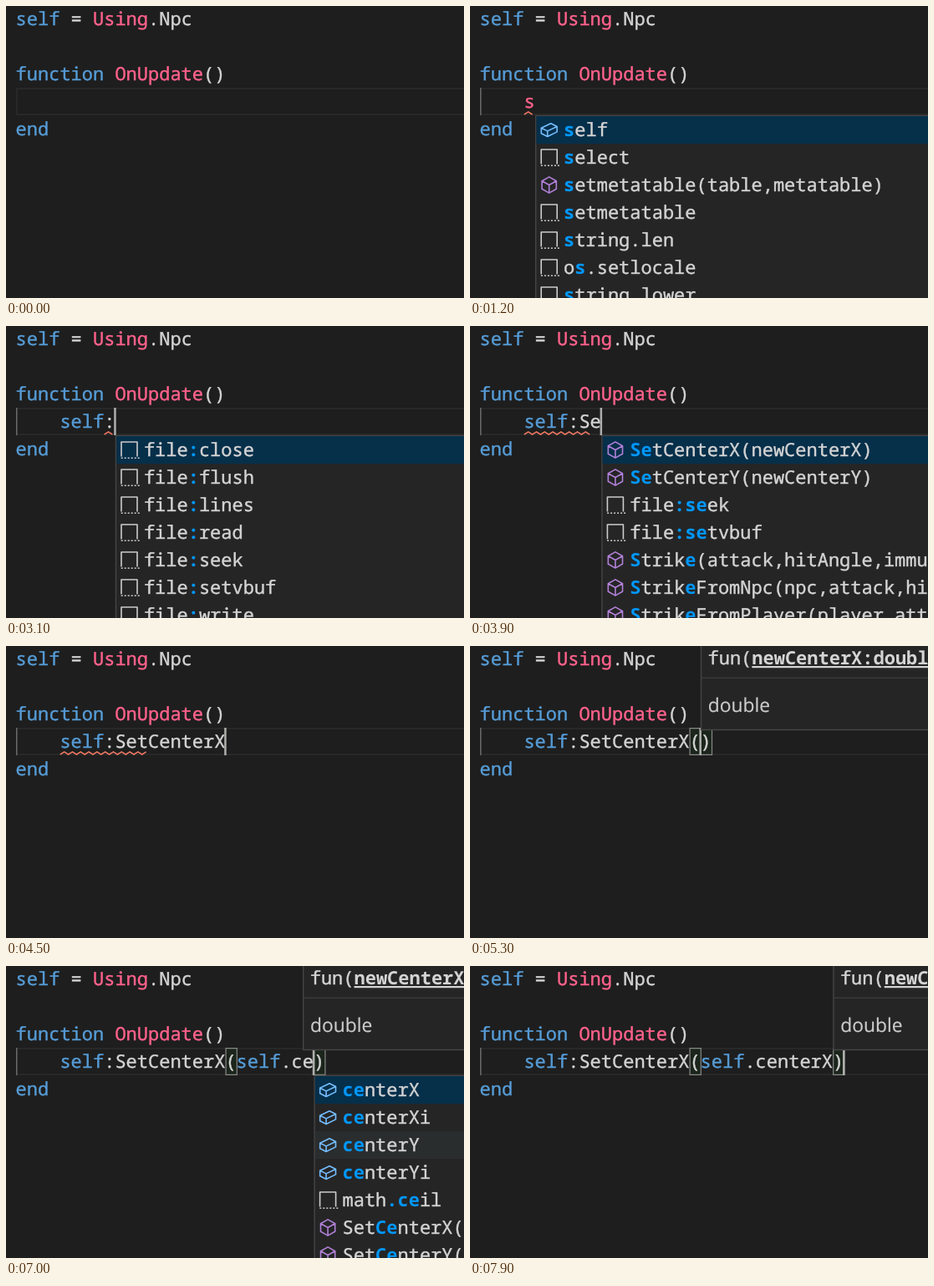
An HTML page for the animation above (8 s loop, 548x350 px).

```html
<!DOCTYPE html>
<html lang="en">
<head>
<meta charset="utf-8">
<title>Editor completion</title>
<style>
  html, body { margin: 0; width: 100%; height: 100%; overflow: hidden; background: #1e1e1e; }
  svg { display: block; width: 548px; height: 350px; }
  text { font: 22px "Noto Sans Mono", "DejaVu Sans Mono", monospace; color: #d4d4d4;
         white-space: pre; text-rendering: geometricPrecision; }
  text, tspan { fill: currentColor; stroke: currentColor; stroke-width: .4; }
  .kw { color: #569cd6; }
  .id { color: #ff628c; }
  .hit { color: #0097fb; font-weight: bold; stroke: none; }
  .param { font-weight: bold; text-decoration: underline; stroke: none; }
  .doc { font: 22.8px "Open Sans", "Noto Sans", sans-serif; color: #cccccc; stroke-width: .2; }
  .panel { fill: #252526; stroke: #454545; stroke-width: 1.4; }
  .icon { fill: none; stroke-linejoin: round; }
</style>
</head>
<body>
<svg id="stage" viewBox="0 0 548 350"></svg>
<script>
const stage = document.getElementById('stage');
const LOOP = 8000, ADV = 13.2, ROW = 33, TOP = 98;
const colX = c => 12 + ADV * c;

// Each item: icon letter (t text, m method, f field), then the label
const LISTS = {
  io: ['close', 'flush', 'input', 'lines', 'open', 'output', 'popen'].map(n => 't io.' + n),
  file: ['close', 'flush', 'lines', 'read', 'seek', 'setvbuf', 'write'].map(n => 't file:' + n),
  set: ['m SetCenterX(newCenterX)', 'm SetCenterY(newCenterY)', 't file:seek', 't file:setvbuf',
    'm Strike(attack,hitAngle,immuneTime)', 'm StrikeFromNpc(npc,attack,hitAngle)',
    'm StrikeFromPlayer(player,attack,hitAngle)'],
  self: ['f self', 't select', 'm setmetatable(table,metatable)', 't setmetatable',
    't string.len', 't os.setlocale', 't string.lower'],
  center: ['f centerX', 'f centerXi', 'f centerY', 'f centerYi', 't math.ceil',
    'm SetCenterX(newCenterX)', 'm SetCenterY(newCenterY)']
};
LISTS.set3 = LISTS.set.filter(s => !s.endsWith('seek'));

const CALL = 'self:SetCenterX(';
// Every step changes only the listed properties
const STEPS = [
  [0, { code: '', tail: '', caret: 0, guide: 0, list: '', wave: null, hint: 0, boxes: 0 }],
  [400, { caret: 1 }],
  [800, { code: 's', guide: 1 }],
  [900, { list: 'self', wave: [4, 5] }],
  [1200, { caret: 0 }],
  [1500, { code: 'self', caret: 1, list: '' }],
  [1700, { wave: [4, 8] }],
  [1900, { code: 'self.' }],
  [2000, { list: 'io' }],
  [2100, { wave: [8, 9] }],
  [2500, { caret: 0 }],
  [2600, { code: 'self', caret: 1, list: '', wave: null }],
  [2700, { wave: [4, 8] }],
  [3100, { code: 'self:', list: 'file', wave: [8, 9] }],
  [3500, { code: 'self:S', list: 'set' }],
  [3600, { wave: [4, 10] }],
  [3900, { code: 'self:Se' }],
  [4100, { code: 'self:Set', list: 'set3' }],
  [4200, { wave: [4, 12] }],
  [4500, { code: 'self:SetCenterX', list: '' }],
  [4700, { wave: [4, 19] }],
  [4900, { caret: 0 }],
  [5200, { code: CALL, tail: ')', caret: 1, wave: null }],
  [5300, { hint: 20, boxes: 1 }],
  [5500, { code: CALL + 's' }],
  [5600, { list: 'self', hint: 21 }],
  [5700, { code: CALL + 'se' }],
  [5800, { code: CALL + 'sel', hint: 22 }],
  [5900, { hint: 23 }],
  [6000, { code: CALL + 'self' }],
  [6100, { list: '', hint: 24 }],
  [6200, { code: CALL + 'self.' }],
  [6300, { list: 'io', hint: 25 }],
  [6600, { caret: 0 }],
  [6900, { code: CALL + 'self.c', list: 'center', caret: 1 }],
  [7000, { code: CALL + 'self.ce', hint: 26 }],
  [7100, { code: CALL + 'self.cen', hint: 27 }],
  [7200, { hint: 28 }],
  [7500, { code: CALL + 'self.centerX', list: '', hint: 32 }],
  [7900, { code: CALL + 'self.centerX)', tail: '' }]
];

const span = (cls, s) => `<tspan class="${cls}">${s}</tspan>`;
const text = (x, y, s, cls = '') => `<text x="${x}" y="${y}" class="${cls}">${s}</text>`;
const rect = (x, y, w, h, attrs) => `<rect x="${x}" y="${y}" width="${w}" height="${h}" ${attrs}/>`;
const line = (row, s, col = 0) => text(colX(col) - 0.4, 23 + ROW * row, s);

const paint = code => code.replace(/(^|\()(\w+)/g,
  (_, pre, word) => pre + span(word === 'self' ? 'kw' : 'id', word));

// Marks the letters of a label that match the typed word
function mark(label, word) {
  const low = label.toLowerCase(), hits = new Set();
  let q = word.toLowerCase();
  if (!low.includes(q[0])) q = q.replace(/^[.:]/, '');
  let n = q.length;
  while (n && !low.includes(q.slice(0, n))) n--;
  let at = low.indexOf(q.slice(0, n));
  for (let i = 0; i < n; i++) hits.add(at + i);
  at += n;
  for (const ch of q.slice(n)) {
    let i = low.indexOf(ch, at);
    if (i < 0) i = low.indexOf(ch);
    if (i >= 0) { hits.add(i); at = i + 1; }
  }
  return [...label].map((ch, i) => hits.has(i) ? span('hit', ch) : ch).join('');
}

const ICONS = {
  t: ['#cccccc', 'M-9.5 8V-9.5H9.5V8M-9.8 9.8h2m2 0h2m2 0h2m2 0h2m2 0h2m2 0h2'],
  m: ['#b180d7', 'M0-9.6L8.6-4.8V4.8L0 9.6L-8.6 4.8V-4.8ZM-8.6-4.8L0 0L8.6-4.8M0 0V9.6'],
  f: ['#75beff', 'M-9.4-2.2L2-7.8L9.4-4V2.4L-2 8L-9.4 4.2ZM-9.4-2.2L-2 1.4L9.4-4M-2 1.4V8']
};
function icon(kind, x, y) {
  const [color, d] = ICONS[kind];
  return `<path class="icon" d="${d}" transform="translate(${x} ${y})" stroke="${color}" stroke-width="1.6"/>`;
}

function popup(name, code, hover) {
  const x = colX(4 + code.length), items = LISTS[name];
  const word = code.match(/[.:]?\w*$/)[0];
  let out = rect(x + 0.7, 131.5, 600, ROW * items.length + 1, 'class="panel"');
  items.forEach((item, i) => {
    const y = 132 + ROW * i;
    const fill = i === 0 ? '#062f4a' : i === 2 && hover ? '#2a2d2e' : '';
    if (fill) out += rect(x + 1.5, y, 600, ROW, `fill="${fill}"`);
    out += icon(item[0], x + 16.7, y + 16.5) + text(x + 34.1, y + 24, mark(item.slice(2), word));
  });
  return out;
}

function hint(col) {
  const x = colX(col) + 0.5;
  return rect(x, -10, 600, 110.5, 'class="panel"') +
    rect(x, 37.6, 600, 1.2, 'fill="#404040"') +
    text(x + 8, 22, 'fun(' + span('param', 'newCenterX:double') + ')') +
    text(x + 8.3, 78.8, 'double', 'doc');
}

function squiggle([from, to]) {
  const end = colX(to);
  let d = '', up = false;
  for (let x = colX(from); x <= end; x += 4.9, up = !up) d += `${d ? 'L' : 'M'}${x.toFixed(1)} ${up ? 126.8 : 130}`;
  return `<path d="${d}" fill="none" stroke="#ee7862" stroke-width="1.5"/>`;
}

const bracket = col => rect(colX(col) + 0.3, TOP + 0.6, ADV, 31.8,
  'fill="#006400" fill-opacity=".1" stroke="#888888" stroke-width="1.2"');

function draw(s, t) {
  const caretCol = 4 + s.code.length;
  let out = rect(0, 0, 548, 350, 'fill="#1e1e1e"') +
    rect(13, 99, 560, 31, 'fill="none" stroke="#282828" stroke-width="2"');
  if (s.guide) out += rect(12, TOP, 1.5, ROW, 'fill="#686868"');
  if (s.boxes) out += bracket(19) + bracket(s.tail ? caretCol : caretCol - 1);
  out += line(0, span('kw', 'self') + ' = ' + span('id', 'Using') + '.Npc') +
    line(2, span('kw', 'function') + ' ' + span('id', 'OnUpdate') + '()') +
    line(3, paint(s.code) + s.tail, 4) +
    line(4, span('kw', 'end'));
  if (s.wave) out += squiggle(s.wave);
  if (s.caret) out += rect(colX(caretCol) - 1.6, TOP, 2.5, ROW, 'fill="#aeafad"');
  if (s.hint) out += hint(s.hint);
  if (s.list) out += popup(s.list, s.code, t >= 5500);
  stage.innerHTML = out;
}

const start = performance.now();
let shown = -1;
function tick() {
  const t = (performance.now() - start) % LOOP;
  const past = STEPS.filter(step => step[0] <= t);
  if (past.length !== shown) {
    shown = past.length;
    draw(Object.assign({}, ...past.map(step => step[1])), t);
  }
  requestAnimationFrame(tick);
}
tick();
</script>
</body>
</html>
```
